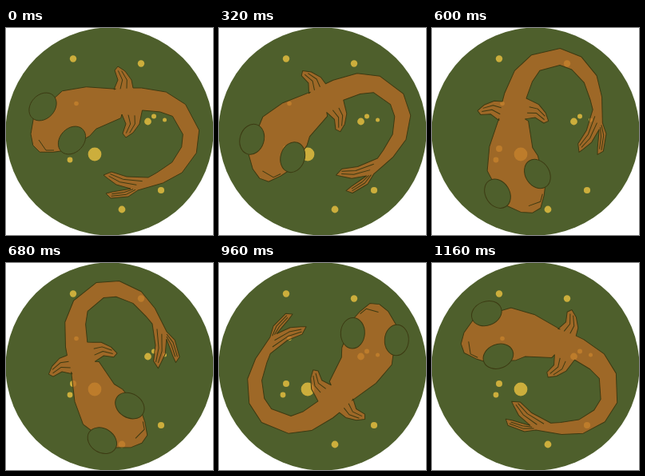
Write an HTML page with a canvas that moves like this. It is 259 px wide and 259 px high and loops after 1200 ms.

```html
<!DOCTYPE html>
<html lang="en">
<head>
<meta charset="utf-8">
<title>Swimming fish</title>
<style>
html, body { margin: 0; width: 100%; height: 100%; overflow: hidden; background: #fff; }
canvas { display: block; }
</style>
</head>
<body>
<canvas width="259" height="259"></canvas>
<script>
const ctx = document.querySelector('canvas').getContext('2d');
const LOOP = 1200, STEP = 40;
const POND = '#4e5f2c', DOT = '#ccae3c', BODY = '#b86b26', LINE = '#3c3a12';
const PIVOT = [134.5, 129.5];

// x, y, radius
const dots = [
  [84, 38.5, 4.2], [169, 44.5, 4.2], [88, 94.5, 2.8], [177.5, 117, 4.4],
  [185, 110.5, 3], [198.5, 115, 2.5], [111, 158, 8.4], [84, 151, 4],
  [80, 165, 3.4], [145, 227, 4.4], [194, 203, 4.1]
];

// Snout to tail: x, y, half width
const spine = [
  [38, 151, 6], [45, 144, 18], [53, 132.5, 28], [87.5, 107, 33], [106.5, 100, 27],
  [140.5, 94.5, 18.5], [170, 89, 14], [196.5, 92.5, 13], [216.5, 103, 11],
  [231.5, 130.5, 10.5], [229, 152.5, 10], [214, 174.5, 9], [192.5, 187.5, 7.5]
];
const eyes = [[46, 98.5], [82.5, 140.5]];
const mouth = [[41, 140], [50, 153], [60, 153]];

// Each fan has seven points: three up one edge, the tip, three down the other
const fin = (x, y, flip) =>
  [[-12, 1], [-7, -11], [-11, -23], [-7, -28], [2, -22], [10, -11], [12, -1]]
    .map(([u, v]) => [x + u, y + v * flip]);
const dorsal = fin(147, 76, 1);
const pelvic = fin(157, 109, -1).reverse();
const lowerTail = [[165, 203], [153, 211], [131, 213], [125, 207], [133, 205], [145, 203], [156, 201]];
const upperTail = [[156, 201], [138, 196], [127, 188], [122, 184], [132, 180], [151, 186], [178, 187]];

// One flank of the body, set off from the spine along its normal
const flank = side => spine.map(([x, y, w], i) => {
  const a = spine[Math.max(i - 1, 0)], b = spine[Math.min(i + 1, spine.length - 1)];
  const dx = b[0] - a[0], dy = b[1] - a[1], k = side * w / Math.hypot(dx, dy);
  return [x + dy * k, y - dx * k];
});

const outer = flank(1), inner = flank(-1);
const path = points => new Path2D('M' + points.join(' '));
const body = path([
  ...outer.slice(0, 6), ...dorsal, ...outer.slice(6), ...lowerTail, ...upperTail,
  ...inner.slice(6).reverse(), ...pelvic, ...inner.slice(0, 6).reverse()
]);
body.closePath();

// Lines inside a fan, spread evenly between its two edges
const creases = fan => [1 / 3, 2 / 3].map(k => path([0, 1, 2].map(i =>
  [0, 1].map(c => fan[i][c] * (1 - k) + fan[6 - i][c] * k))));
const lines = [path(mouth), ...[dorsal, pelvic, lowerTail, upperTail].flatMap(creases)];

// Degrees turned after s seconds: a steady glide, then an accelerating sweep
function turn(s) {
  const u = s - 0.48;
  return s < 0.42 ? 79 * s : 44.5 + 220 * u + 303 * u * u;
}

function disc(x, y, r, color) {
  ctx.fillStyle = color;
  ctx.beginPath();
  ctx.arc(x, y, r, 0, 2 * Math.PI);
  ctx.fill();
}

function drawFish() {
  ctx.strokeStyle = LINE;
  ctx.lineJoin = 'round';
  ctx.globalAlpha = 0.75;
  ctx.fillStyle = BODY;
  ctx.fill(body);
  ctx.globalAlpha = 1;
  ctx.stroke(body);
  lines.forEach(l => ctx.stroke(l));
  ctx.fillStyle = POND;
  for (const [x, y] of eyes) {
    ctx.beginPath();
    ctx.ellipse(x, y, 19.3, 15, -0.82, 0, 2 * Math.PI);
    ctx.fill();
    ctx.stroke();
  }
}

function draw(now) {
  const t = Math.floor((now % LOOP) / STEP) * STEP;
  ctx.clearRect(0, 0, 259, 259);
  disc(129.5, 129.5, 130, POND);
  dots.forEach(d => disc(...d, DOT));
  ctx.save();
  ctx.translate(...PIVOT);
  ctx.rotate(-turn(t / 1000) * Math.PI / 180);
  ctx.translate(-PIVOT[0], -PIVOT[1]);
  drawFish();
  ctx.restore();
  requestAnimationFrame(draw);
}
requestAnimationFrame(draw);
</script>
</body>
</html>
```
